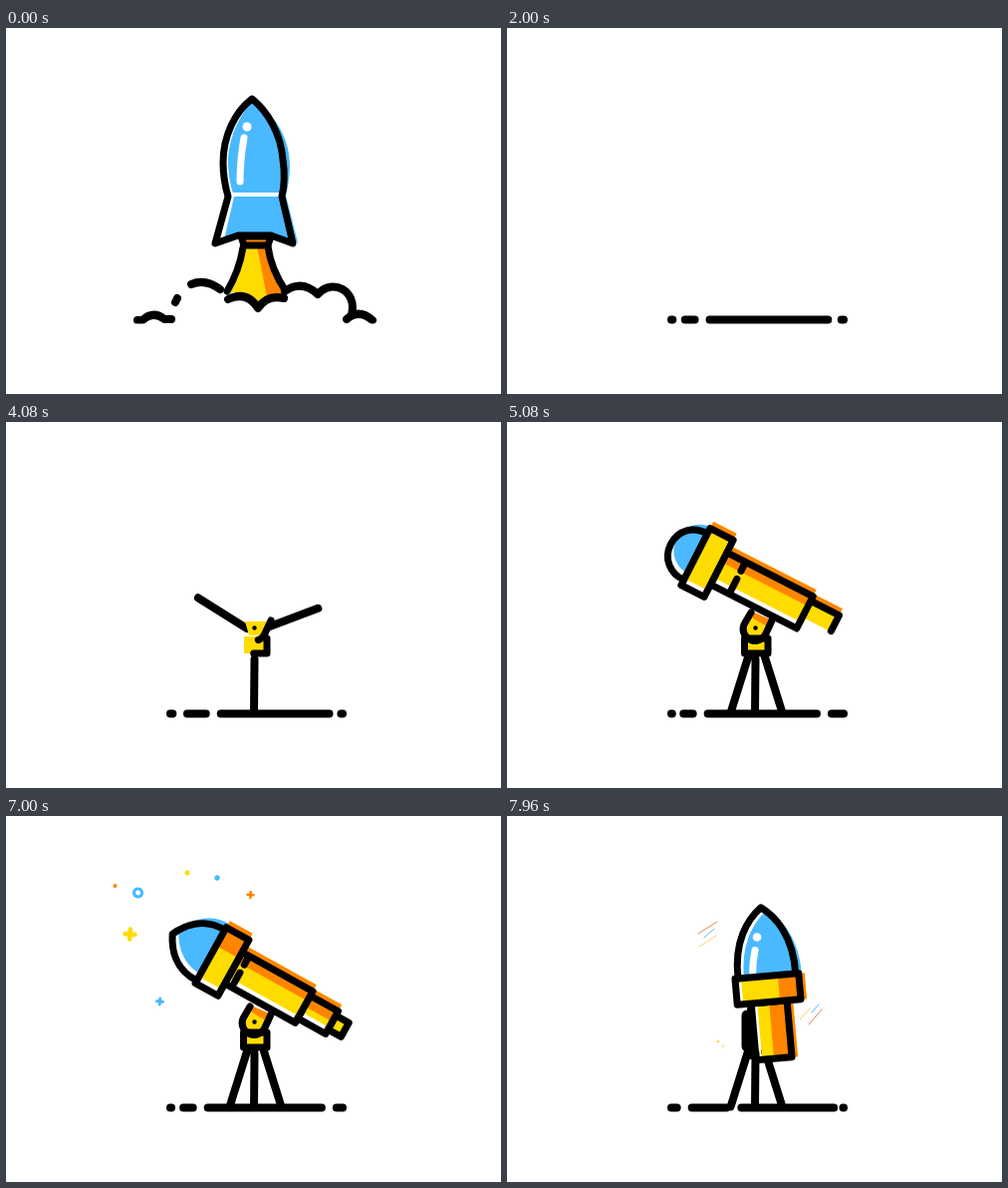
Animation, 497 px wide and 367 px high, one loop 8000 ms. Source, as an HTML page:

```html
<!DOCTYPE html>
<html lang="en">
<head>
<meta charset="utf-8">
<title>Rocket and telescope</title>
<style>
html, body { margin: 0; width: 100%; height: 100%; overflow: hidden; background: #fff; }
svg { display: block; width: 100vw; height: 100vh; }
.k { fill: none; stroke: #000; stroke-width: 8; stroke-linecap: round; stroke-linejoin: round; }
.thin { stroke-width: 7; }
.w { fill: none; stroke: #fff; stroke-linecap: round; }
.s { fill: none; stroke-linecap: round; }
</style>
</head>
<body>
<svg id="stage" viewBox="0 0 497 367"></svg>
<script>
const stage = document.getElementById('stage');
const LOOP = 8000, STEP = 40;
const BLUE = '#4ab9ff', YELLOW = '#ffdc00', ORANGE = '#ff8500';

const mix = (a, b, p) => a + (b - a) * p;
const ramp = (t, a, b) => Math.min(1, Math.max(0, (t - a) / (b - a)));
const smooth = p => p * p * (3 - 2 * p);
const back = p => 1 + 2.7 * (p - 1) ** 3 + 1.7 * (p - 1) ** 2;
const ease = (t, a, b) => smooth(ramp(t, a, b));
const pop = (t, a, b) => back(ramp(t, a, b));

const path = (d, attrs) => `<path d="${d}" ${attrs}/>`;
const ink = (d, extra = '') => path(d, `class="k" ${extra}`);
const thin = (d, extra = '') => path(d, `class="k thin" ${extra}`);
const fill = (d, color) => path(d, `fill="${color}"`);
const group = (transform, body, extra = '') => `<g transform="${transform}" ${extra}>${body}</g>`;
const about = (x, y, sx, sy = sx) => `translate(${x} ${y}) scale(${sx} ${sy}) translate(${-x} ${-y})`;
const box = (x0, x1, y0, y1) => `M${x0} ${y0}H${x1}V${y1}H${x0}Z`;
const reveal = p => p < 1 ? `pathLength="1" stroke-dasharray="${p} 2"` : '';

function rocket(t) {
  if (t > 840) return '';
  const hull = 'M247 71C230 84 218 108 218 135Q218 152 223 169L210 216L233 208H266L288 216L277 169Q281 152 278 132C276 106 263 84 247 71Z';
  return group(`translate(0 ${-300 * (t / 800) ** 1.8})`,
    fill('M239 218Q234 244 222 266Q240 261 253 280Q263 264 281 272L283 264Q267 243 263 218Z', YELLOW) +
    fill('M252 219H263Q267 243 284 264L280 272L262 270Z', ORANGE) +
    thin('M238 220Q234 244 222 264M263 219Q266 242 281 264') +
    fill('M247 74C268 84 285 108 285 138Q285 152 281 168L293 215L270 208H238L219 212L229 169Q222 150 223 128Q227 96 247 74Z', BLUE) +
    path('M224 167H280', 'class="w" stroke-width="4"') +
    path('M239 110Q235 132 235 154', 'class="w" stroke-width="7"') +
    '<circle cx="242" cy="99" r="4.5" fill="#fff"/>' +
    thin(hull) +
    thin('M236 209H266L263 218H239Z', `style="fill:${ORANGE}"`));
}

function smoke(t) {
  if (t > 1640) return '';
  const sy = mix(1, 1.6, ease(t, 0, 840)) * (1 - ease(t, 840, 1640));
  const sx = mix(1, 0.73, ease(t, 700, 1640));
  const front = 'Q242 263 253 281Q262 267 279 271';
  const side = 'M280 264Q297 252 313 267C328 250 353 264 347 287';
  return group(about(250, 292, sx, sy),
    fill(`M222 272${front}L${side.slice(1)}V293H222Z`, '#fff') +
    ink(`M186 257Q200 251 215 262M223 272${front}${side}M342 292Q354 281 368 293` +
      'M132 293H137Q148 283 159 292H166M170 275L172 271', 'vector-effect="non-scaling-stroke"'),
    'clip-path="url(#floor)"');
}

// Gaps rest at stops along the line and hop on to the next stop once per cycle.
const CYCLE = 1840, STOPS = [160, 172.5, 196, 329, 345];

function ground(t) {
  if (t < 1600) return '';
  const hop = ramp((t - 220) % CYCLE, 0, 1340);
  const p = (hop + smooth(hop)) / 2;
  const since = Math.max(0, t - 2560);
  const dent = 18 * Math.exp(-since / 150) * Math.sin(since / 70);
  const yAt = x => 292.5 + dent * Math.sin(Math.PI * (x - 165) / 173);
  let x = 165, d = '';
  const dash = (a, b) => {
    if (b < a) return;
    const m = (a + b) / 2;
    d += `M${a} ${yAt(a)}Q${m} ${2 * yAt(m) - (yAt(a) + yAt(b)) / 2} ${b + 0.01} ${yAt(b)}`;
  };
  for (let i = 1; i < STOPS.length; i++) {
    const g = mix(STOPS[i - 1], STOPS[i], p);
    const w = Math.min(7, g - 168, (334 - g) * 1.1);
    if (w <= 0) continue;
    dash(x, g - w / 2 - 4);
    x = g + w / 2 + 4;
  }
  dash(x, 338);
  return ink(d);
}

function tripod(t) {
  if (t < 2320) return '';
  const height = mix(175 * pop(t, 2320, 2840), 54, ease(t, 3400, 4000));
  let d = `M249.5 ${292 - height}L249 291`;
  if (t > 3400) {
    const hip = mix(174, 236, ease(t, 3400, 4700));
    const leg = (dx, landing) => {
      const a = Math.PI * mix(1, 0.097, ramp(t, 3400, landing) ** 2);
      const x = 249 + dx * ease(t, 3400, 4080);
      d += `M${x} ${hip}L${x + Math.sign(dx) * 58 * Math.sin(a)} ${hip + 58 * Math.cos(a)}`;
    };
    leg(-7, 4540);
    leg(10, 4440);
  }
  return ink(d);
}

function joint(t) {
  if (t < 3800) return '';
  if (t > 7480) return path('M241 200V231', 'class="k" style="stroke-width:11"') + ink('M245 194V240');
  const drawn = reveal(ramp(t, 3900, 4390));
  const arm = 'M266 199L260 212A11.5 11.5 0 0 1 238 203L245 191';
  return group(about(250, 214, ease(t, 3800, 4040)),
    fill('M239 215H262V232H239Z', YELLOW) +
    (t < 4240 ? fill('M240 200H263L260 214H244Z', YELLOW)
      : fill(arm + 'Z', YELLOW) + fill('M246 190L267 199L263 206L247 197Z', ORANGE)) +
    thin('M262 217V232H238.5V217Z', drawn) + thin(arm, drawn) +
    '<circle cx="249.5" cy="206.5" r="2.2"/>');
}

// Local x runs from the lens to the eyepiece, with the ring at the origin.
function scope(t) {
  if (t < 4290) return '';
  const aim = ease(t, 6400, 7000), turn = pop(t, 7200, 7720), fold = ease(t, 7160, 7480);
  const pose = (rest, aimed, upright) => mix(mix(rest, aimed, aim), upright, turn);
  const point = aim, shine = ease(t, 7240, 7560), shade = ease(t, 5080, 5600);
  const end = pose(110, 94, 70) * mix(0.4, 1, ease(t, 4360, 4760));
  const bulge = 6 * (1 - ease(t, 5080, 5320));
  const lens = (pose(22, 44, 69) + bulge) * ease(t, 4720, 4960);
  const inner = 32 * ease(t, 4840, 5040) * (1 - fold);
  const eye = 15 * ease(t, 5080, 5280) * (1 - fold);
  const slot = pose(34, 21, 8);
  const shift = mix(7.5, 6, shine);

  const part = (x0, x1, h, edge, drawn = 1) =>
    fill(box(x0, x1, -h - shift, h - shift), YELLOW) +
    fill(box(x0, x1, -h - shift, edge), ORANGE) +
    thin(`M${x0} ${-h}H${x1}V${h}H${x0}Z`, reveal(drawn));

  let body = '';
  if (eye > 1) {
    const lid = box(end + inner, end + inner + eye, -8, 8);
    body += fill(lid, YELLOW) + thin(lid);
  }
  if (inner > 1) body += part(end, end + inner, 13, mix(-13, -1, shade), ramp(t, 4960, 5240));
  body += part(13, end, 18, mix(-7, 0, shine));
  if (shine < 1) body += thin(`M${slot} -15V-8M${slot} 1V14`);

  if (lens > 1) {
    const tip = -13 - lens, base = 26 + 3 * point;
    const c1 = -13 - lens * 0.55, c2 = tip + lens * 0.15 * point, h = 16 - 2 * point;
    const dome = `M-13 ${base}C${c1} ${base + 1} ${c2} ${h} ${tip} 0C${c2} ${-h} ${c1} ${-base - 1} -13 ${-base}`;
    body += group(`translate(3 ${-shift})`, fill(dome + 'Z', BLUE));
    if (shine > 0) body += `<g opacity="${shine}"><circle cx="-52.7" cy="6.4" r="4.3" fill="#fff"/>` +
      path('M-40 9.5Q-28 13 -17 14', 'class="w" stroke-width="7"') + '</g>';
    body += thin(dome);
  }
  body += part(-13, 13, 32, mix(-32, mix(-18, -11, aim), shade));
  return group(`${about(250, 206, pop(t, 4280, 4720))} translate(${pose(201, 217, 262)} ${pose(141, 146, 173.5)}) rotate(${pose(27, 29, 85)})`, body);
}

const plus = (r, color, w) => path(`M${-r} 0H${r}M0 ${-r}V${r}`, `class="s" stroke="${color}" stroke-width="${w}"`);
const dot = (r, color) => `<circle r="${r}" fill="${color}"/>`;
const ring = (r, color, w) => `<circle r="${r}" class="s" stroke="${color}" stroke-width="${w}"/>`;
const stars = [
  [109.5, 70, dot(2, ORANGE)],
  [132.5, 77, ring(4, BLUE, 3.2)],
  [182, 57, dot(2.6, YELLOW)],
  [212, 62, dot(2.7, BLUE)],
  [245.5, 79, plus(3, ORANGE, 2.6)],
  [124.5, 118.5, plus(5, YELLOW, 4.6)],
  [154.5, 186, plus(3, BLUE, 3)]
];

function sparkle(t) {
  if (t < 6520 || t > 7400) return '';
  const far = mix(0.3, 1, ease(t, 6520, 7000)) + 0.06 * ease(t, 7000, 7400);
  const size = ease(t, 6520, 6880) * (1 - ease(t, 7120, 7400));
  const spin = (t - 7000) / 12 + 4;
  return stars.map(([x, y, shape]) =>
    group(`translate(${mix(185, x, far)} ${mix(125, y, far)}) rotate(${spin}) scale(${size})`, shape)).join('');
}

function streaks(t) {
  if (t < 7720) return '';
  const p = ease(t, 7680, 7840);
  const line = (x, y, dx, dy, c) => path(`M${x} ${y}l${dx * p} ${dy * p}`, `class="s" stroke="${c}" stroke-width="1"`);
  const rust = '#d98a45', sand = '#f3d56a';
  return line(192, 118, 19, -12, rust) + line(198, 122, 10, -9, BLUE) + line(193, 131, 17, -11, sand) +
    line(294, 204, 10, -11, sand) + line(306, 197, 7, -8, BLUE) + line(303, 209, 13, -15, rust) +
    group('translate(212 226)', dot(1.5, sand)) + group('translate(217 231)', dot(1, sand));
}

const defs = '<defs><clipPath id="floor"><path d="M-100 -400H600V296.5H-100Z"/></clipPath></defs>';
const layers = [rocket, smoke, ground, tripod, joint, scope, sparkle, streaks];

function render(t) {
  stage.innerHTML = defs + layers.map(layer => layer(t)).join('');
}

let start = null;
function tick(now) {
  if (start === null) start = now;
  const t = Math.max(0, now - start) % LOOP;
  render(Math.floor(t / STEP) * STEP);
  requestAnimationFrame(tick);
}
render(0);
requestAnimationFrame(tick);
</script>
</body>
</html>
```
